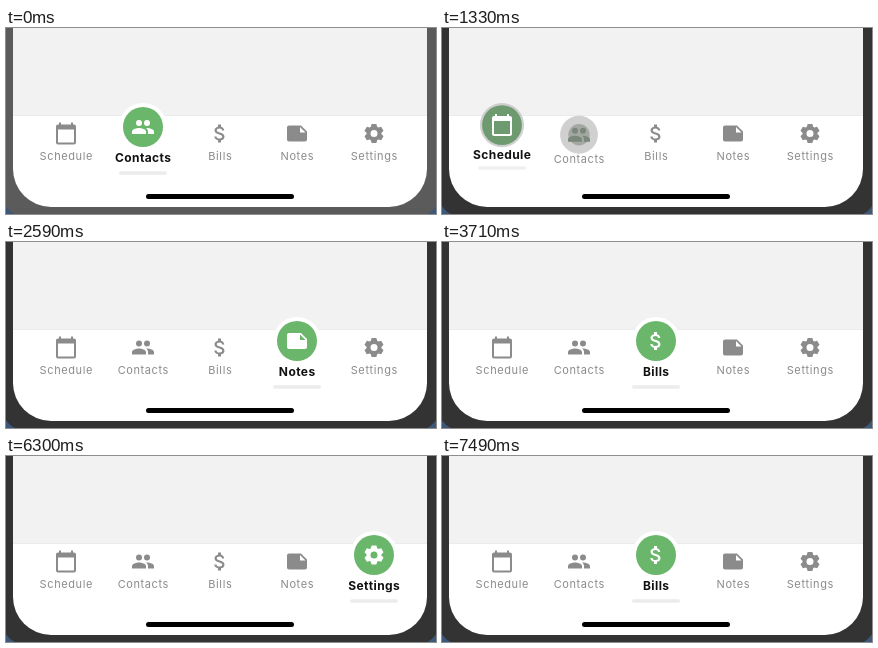
An HTML page with a canvas that plays this animation: 430 by 186 pixels, repeating every 8000 ms.

```html
<!DOCTYPE html>
<html lang="en">
<head>
<meta charset="utf-8">
<title>Tab bar</title>
<style>
html, body { margin: 0; width: 100%; height: 100%; overflow: hidden; background: #333; }
canvas { display: block; width: 430px; height: 186px; }
</style>
</head>
<body>
<canvas id="stage"></canvas>
<script>
const W = 430, H = 186, LOOP = 8000, STEP = 70;
const GREEN = [106, 183, 108], GREY = '#8b8b8b';
const canvas = document.getElementById('stage');
const ctx = canvas.getContext('2d');
const dpr = window.devicePixelRatio || 1;
canvas.width = W * dpr;
canvas.height = H * dpr;

// Icons live in a 24 x 24 box
const calendar = new Path2D('M20 3h-1V1h-2v2H7V1H5v2H4c-1.1 0-2 .9-2 2v16c0 1.1.9 2 2 2h16c1.1 0 2-.9 2-2V5c0-1.1-.9-2-2-2zm0 18H4V8h16v13z');
const dollar = new Path2D('M11.8 10.9c-2.27-.59-3-1.2-3-2.15 0-1.09 1.01-1.85 2.7-1.85 1.78 0 2.44.85 2.5 2.1h2.21c-.07-1.72-1.12-3.3-3.21-3.81V3h-3v2.16c-1.94.42-3.5 1.68-3.5 3.61 0 2.31 1.91 3.46 4.7 4.13 2.5.6 3 1.48 3 2.41 0 .69-.49 1.79-2.7 1.79-2.06 0-2.87-.92-2.98-2.1h-2.2c.12 2.19 1.76 3.42 3.68 3.83V21h3v-2.15c1.95-.37 3.5-1.5 3.5-3.55 0-2.84-2.43-3.81-4.7-4.4z');
const note = new Path2D('M22 10l-6-6H4c-1.1 0-2 .9-2 2v12c0 1.1.9 2 2 2h16c1.1 0 2-.9 2-2v-8zm-7-4.5l5.5 5.5H15V5.5z');

function makePeople() {
  const p = new Path2D('M8 13c-2.33 0-7 1.17-7 3.5V19h14v-2.5c0-2.33-4.67-3.5-7-3.5zm8 0l-.97.05c1.16.84 1.97 1.97 1.97 3.45V19h6v-2.5c0-2.33-4.67-3.5-7-3.5z');
  for (const x of [8, 16]) {
    p.moveTo(x + 3, 8);
    p.arc(x, 8, 3, 0, Math.PI * 2);
  }
  return p;
}

function makeGear() {
  const p = new Path2D();
  const corners = [[-0.45, 7.4], [-0.24, 9.9], [0.24, 9.9], [0.45, 7.4]];
  for (let i = 0; i < 6; i++) {
    for (const [turn, r] of corners) {
      const a = i * Math.PI / 3 - Math.PI / 2 + turn;
      p.lineTo(12 + r * Math.cos(a), 12 + r * Math.sin(a));
    }
  }
  p.closePath();
  p.moveTo(15.5, 12);
  p.arc(12, 12, 3.5, 0, Math.PI * 2);
  return p;
}

const tabs = [
  ['Schedule', calendar], ['Contacts', makePeople()], ['Bills', dollar],
  ['Notes', note], ['Settings', makeGear()]
].map(([label, icon], i) => ({ label, icon, x: 60 + 77 * i }));

const FIRST = 1;
const moves = [
  { at: 1120, dur: 310, to: 0 },
  { at: 2290, dur: 300, to: 3 },
  { at: 3440, dur: 270, to: 2 },
  { at: 4912, dur: 268, to: 4 },
  { at: 7190, dur: 300, to: 2 }
];

const mix = (a, b, p) => a + (b - a) * p;
const ease = u => u * u * (3 - 2 * u);

// Colour on its way from transparent black
function tint(rgb, a) {
  return `rgba(${rgb.map(v => Math.round(v * a)).join(',')},${a})`;
}

function disc(x, y, r, fill) {
  ctx.fillStyle = fill;
  ctx.beginPath();
  ctx.arc(x, y, r, 0, Math.PI * 2);
  ctx.fill();
}

function pill(x, y, w, h, fill) {
  ctx.fillStyle = fill;
  ctx.beginPath();
  ctx.roundRect(x - w / 2, y - h / 2, w, h, h / 2);
  ctx.fill();
}

function drawIcon(tab, y, fill) {
  ctx.save();
  ctx.translate(tab.x - 12, y - 12);
  ctx.fillStyle = fill;
  ctx.fill(tab.icon, 'evenodd');
  ctx.restore();
}

function drawLabel(tab, y, active) {
  const gap = active ? 0.4 : 0.6;
  ctx.font = (active ? '700 12px' : '400 11px') + ' Inter, Roboto, sans-serif';
  ctx.letterSpacing = gap + 'px';
  ctx.fillStyle = active ? '#111' : GREY;
  ctx.textAlign = 'center';
  ctx.fillText(tab.label, tab.x + gap / 2, y + 4);
}

function drawIdle(tab) {
  drawIcon(tab, 105.5, GREY);
  drawLabel(tab, 128, false);
}

function drawEntering(tab, p) {
  const y = mix(91.3, 99, p);
  disc(tab.x, y, mix(16.3, 24, p), tint([255, 255, 255], p));
  disc(tab.x, y, mix(16.3, 20, Math.min(1, p * 1.3)), tint(GREEN, p));
  drawIcon(tab, y, '#fff');
  drawLabel(tab, mix(116.5, 130, p), true);
  pill(tab.x, mix(125, 145, p), 48, 3.5, `rgba(236,236,236,${p})`);
}

function drawLeaving(tab, p) {
  const y = mix(110.5, 105.5, p);
  disc(tab.x, y, mix(24, 17.3, p), tint([255, 255, 255], 1 - p));
  disc(tab.x, y, 10.7, tint(GREEN, 1 - p));
  drawIcon(tab, y, `rgb(${mix(72, 139, p)},${mix(122, 139, p)},${mix(74, 139, p)})`);
  drawLabel(tab, mix(142, 128, p), false);
  const fade = Math.max(0, 1 - 3 * p);
  pill(tab.x, 154 - 10 * p, 37, 3, `rgba(234,234,234,${fade})`);
}

function drawPhone(t) {
  ctx.fillStyle = t < 980 ? '#5b5b5b' : '#333';
  ctx.fillRect(0, 0, W, H);
  ctx.fillStyle = '#3d5878';
  for (const [x, dir] of [[0, 1], [W, -1]]) {
    ctx.beginPath();
    ctx.moveTo(x, 178);
    ctx.quadraticCurveTo(x + 3 * dir, 183, x + 9 * dir, H);
    ctx.lineTo(x, H);
    ctx.fill();
  }
  ctx.save();
  ctx.beginPath();
  ctx.roundRect(7, -60, 414, 239, 38);
  ctx.clip();
  ctx.fillStyle = '#f2f2f2';
  ctx.fillRect(0, 0, W, 88);
  ctx.fillStyle = '#fff';
  ctx.fillRect(0, 88, W, 98);
  ctx.fillStyle = '#ebebeb';
  ctx.fillRect(0, 87, W, 1);
  ctx.restore();
  pill(214, 168.5, 148, 5, '#000');
}

function draw(time) {
  const t = Math.floor((time % LOOP) / STEP) * STEP;
  let from = FIRST, to = FIRST, p = 1;
  for (const m of moves) {
    if (t < m.at) break;
    from = to;
    to = m.to;
    p = ease(Math.min(1, (t - m.at) / m.dur));
  }
  ctx.setTransform(dpr, 0, 0, dpr, 0, 0);
  drawPhone(t);
  tabs.forEach((tab, i) => {
    if (i === to) drawEntering(tab, p);
    else if (i === from && p < 1) drawLeaving(tab, p);
    else drawIdle(tab);
  });
}

const start = performance.now();
function tick() {
  draw(performance.now() - start);
  requestAnimationFrame(tick);
}
tick();
</script>
</body>
</html>
```
